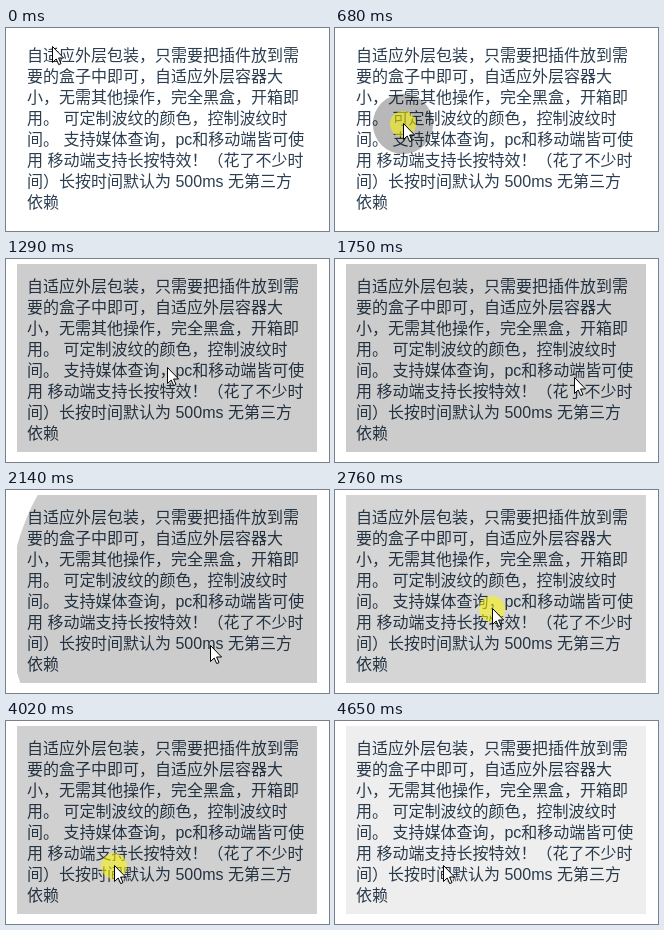
Write an HTML page that moves like this. It is 323 px wide and 203 px high and loops after 5.12 s.

```html
<!DOCTYPE html>
<html lang="zh-CN">
<head>
<meta charset="utf-8">
<title>波纹</title>
<style>
  html, body { margin: 0; width: 100%; height: 100%; overflow: hidden; background: #fff; }
  #text {
    position: absolute; left: 21px; top: 17px; margin: 0;
    font: 350 16px/21px "Liberation Sans", "Noto Sans CJK SC", "Noto Sans CJK", sans-serif;
    color: #2c3e50; white-space: pre;
    text-spacing-trim: space-all; text-autospace: no-autospace;
  }
  svg { position: absolute; left: 0; top: 0; }
</style>
</head>
<body>
<p id="text">自适应外层包装，只需要把插件放到需
要的盒子中即可，自适应外层容器大
小，无需其他操作，完全黑盒，开箱即
用。 可定制波纹的颜色，控制波纹时
间。 支持媒体查询，pc和移动端皆可使
用 移动端支持长按特效！（花了不少时
间）长按时间默认为 500ms 无第三方
依赖</p>
<svg width="323" height="203" viewBox="0 0 323 203">
  <clipPath id="box"><rect x="11" y="5" width="300" height="188"/></clipPath>
  <g id="ripples" clip-path="url(#box)"></g>
  <circle id="halo" r="13" fill="rgb(255,245,0)" fill-opacity=".55"/>
  <path id="cursor" d="M.5 .5V16.5L4.2 13L6.7 18.6L9 17.6L6.6 12H11.6Z" fill="#fff" stroke="#000"/>
</svg>
<script>
const LOOP = 5120, SPEED = 1.16, TINT = 0.2, FADE_FROM = 300, FADE_TO = 650;
const $ = id => document.getElementById(id);
const clamp = (v, lo, hi) => Math.min(hi, Math.max(lo, v));

function set(el, attrs) {
  for (const name in attrs) el.setAttribute(name, attrs[name]);
}

// A long press keeps at least the tint `hold` until `end`.
function press(x, y, down, up, hold = 0, end = up) {
  const el = document.createElementNS('http://www.w3.org/2000/svg', 'circle');
  set(el, { cx: x, cy: y });
  $('ripples').append(el);
  return { x, y, down, up, hold, end, el };
}

const presses = [
  press(68, 96, 655, 780),
  press(68, 96, 975, 1100),
  press(239, 119, 1460, 1580),
  press(239, 119, 1937, 2050),
  press(157, 119, 2399, 3310, 0.165),
  press(108, 145, 3695, 4650, 0.065, LOOP)
];

// The cursor rests during each press and wanders in between: [time, x, y]
const path = [
  [0, 46, 19], [200, 24, 3], [480, 100, 50], [2140, 204, 156], [LOOP, 108, 145],
  ...presses.flatMap(p => [[p.down, p.x, p.y], [p.up, p.x, p.y]])
].sort((a, b) => a[0] - b[0]);

function cursorAt(t) {
  const i = path.findIndex(p => p[0] > t);
  const [t0, x0, y0] = path[i - 1], [t1, x1, y1] = path[i];
  const k = (t - t0) / (t1 - t0), ease = k * k * (3 - 2 * k);
  return [Math.round(x0 + (x1 - x0) * ease), Math.round(y0 + (y1 - y0) * ease) - 1];
}

function tintAt(p, t) {
  const age = t - p.down;
  if (age < 0) return 0;
  const fade = clamp((FADE_TO - age) / (FADE_TO - FADE_FROM), 0, 1);
  const flash = 0.15 * Math.exp(-age / 40);
  return Math.max(TINT * fade + flash, t < p.end ? p.hold : 0);
}

function draw(t) {
  for (const p of presses) {
    set(p.el, { r: Math.max(0, (t - p.down) * SPEED), 'fill-opacity': tintAt(p, t) });
  }
  const held = presses.find(p => t >= p.down && t < p.up);
  set($('halo'), held ? { cx: held.x, cy: held.y, display: 'inline' } : { display: 'none' });
  set($('cursor'), { transform: `translate(${cursorAt(t)})` });
}

const start = performance.now();
function tick() {
  draw((performance.now() - start) % LOOP);
  requestAnimationFrame(tick);
}
tick();
</script>
</body>
</html>
```
